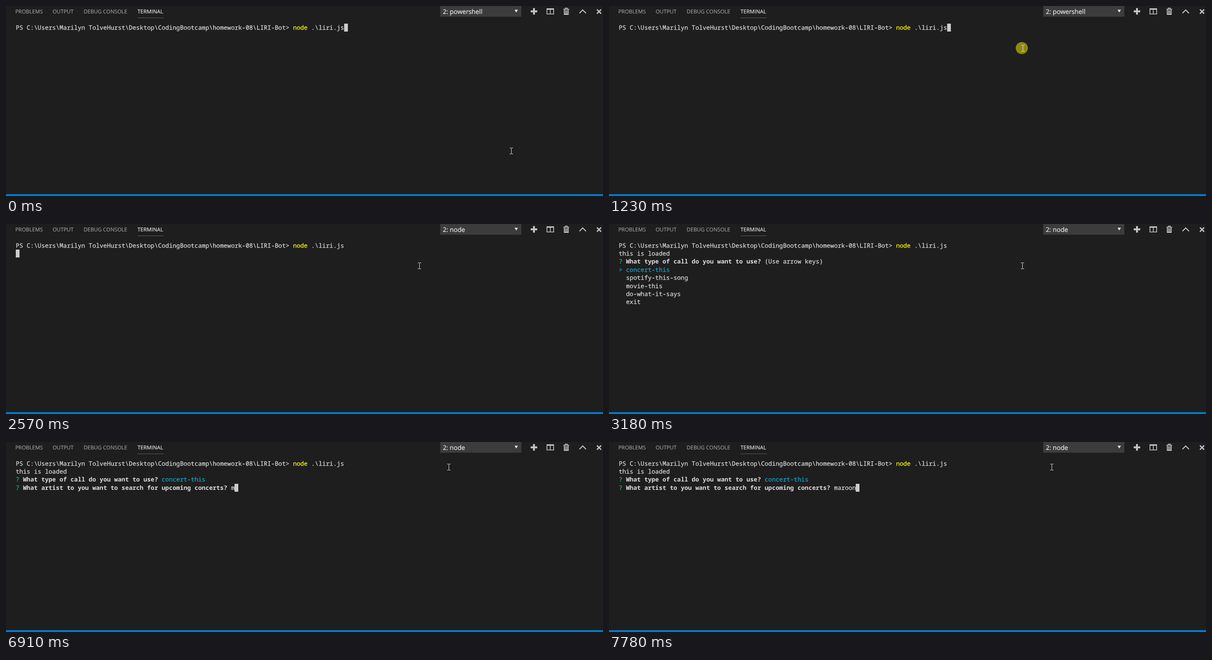
Animation, 1280 px wide and 409 px high, one loop 8 s. Source, as an HTML page:

```html
<!DOCTYPE html>
<html lang="en">
<head>
<meta charset="utf-8">
<title>Terminal session</title>
<style>
  html, body { margin: 0; width: 100%; height: 100%; overflow: hidden; background: #1e1e1e; }
  body { position: relative; text-rendering: geometricPrecision; }
  svg { position: absolute; left: 0; top: 0; font-family: "Open Sans", "Noto Sans", sans-serif; }
  .tabs { font-size: 11.4px; fill: #a0a0a0; stroke: #a0a0a0; stroke-width: .15; }
  .tabs .active { fill: #ededed; stroke: #ededed; }
  #shell { font-size: 13.7px; fill: #f0f0f0; stroke: #f0f0f0; stroke-width: .2; }
  .icons { fill: none; stroke: #c5c5c5; }
  pre {
    position: absolute; left: 20.9px; top: 37.6px; margin: 0;
    font: 13px/17.4px "Noto Sans Mono", "DejaVu Sans Mono", monospace;
    letter-spacing: .022px; font-variant-ligatures: none;
    color: #dadada; -webkit-text-stroke: .25px;
  }
  pre b { color: #dedede; -webkit-text-stroke: 0; }
  .yellow { color: #ffff00; }
  .green { color: #0dbc79; }
  .cyan { color: #11a8cd; }
</style>
</head>
<body>
<pre id="output"></pre>
<svg width="1280" height="409" viewBox="0 0 1280 409">
  <g class="tabs">
    <text x="20" y="16">PROBLEMS</text>
    <text x="100" y="16">OUTPUT</text>
    <text x="166.5" y="16">DEBUG CONSOLE</text>
    <text x="282" y="16" class="active">TERMINAL</text>
  </g>
  <path d="M282 25.5h56" stroke="#5c5c5c"/>
  <path d="M931 0h174v23h-174z" fill="#3c3c3c"/>
  <text id="shell" x="936.5" y="17"></text>
  <path d="M1090.5 8h7l-3.5 6z" fill="#f0f0f0"/>
  <g class="icons">
    <path d="M1125 11.5h14M1132 4.5v14" stroke-width="4"/>
    <path d="M1159 6.5h16" stroke-width="3"/>
    <path d="M1159.8 6v11.2h14.4V6M1167 6v11" stroke-width="1.6"/>
    <path d="M1195 7h12.5M1199 6.5v-2h4.5v2" stroke-width="1.6"/>
    <path d="M1197 8v10h8.5V8M1199.8 9v8M1202.7 9v8" stroke-width="1.8"/>
    <path d="M1229.5 15.5l7-7 7 7" stroke-width="2"/>
    <path d="M1267 7.5l9 9M1276 7.5l-9 9" stroke-width="2.6"/>
  </g>
  <path d="M0 405h1280v4H0z" fill="#007acc"/>
  <rect id="caret" width="8" height="17" fill="#cccccc"/>
  <circle id="click" cx="885" cy="90.5" r="13" fill="#8a8a10"/>
  <path id="pointer" fill="none" stroke="#e4e4e4"
    d="M-3.5 -6.5h3M.5 -6.5h3M0 -6v12M-3.5 6.5h3M.5 6.5h3"/>
</svg>
<script>
const LOOP = 8000, CHAR = 7.822, LINE = 17.4, LEFT = 20.9, TOP = 37.6;
const $ = id => document.getElementById(id);
const paint = (color, text) => `<span class="${color}">${text}</span>`;
const ask = text => `${paint("green", "?")} <b>${text}</b> `;

const command = "PS C:\\Users\\Marilyn TolveHurst\\Desktop\\CodingBootcamp\\homework-08\\LIRI-Bot&gt; "
  + paint("yellow", "node") + " .\\liri.js";
const callQuestion = ask("What type of call do you want to use?");
const artistQuestion = ask("What artist to you want to search for upcoming concerts?");
const menu = [
  callQuestion + "(Use arrow keys)",
  paint("cyan", "&gt; concert-this"),
  "  spotify-this-song", "  movie-this", "  do-what-it-says", "  exit"
];
const artist = "maroon";
const keyTimes = [6910, 7060, 7220, 7460, 7610, 7780];

// Terminal lines and the caret's [column, row]
function terminalAt(t) {
  if (t < 2480) return { lines: [command], caret: [90, 0] };
  if (t < 3180) return { lines: [command], caret: [0, 1] };
  const loaded = [command, "this is loaded"];
  if (t < 5120) return { lines: [...loaded, ...menu] };
  const typed = keyTimes.filter(time => time <= t).length;
  return {
    lines: [...loaded, callQuestion + paint("cyan", "concert-this"),
      artistQuestion + artist.slice(0, typed)],
    caret: [59 + typed, 3]
  };
}

function pointerAt(t) {
  if (t >= 6280) return [949.5, 54];
  if (t >= 6220) return [919.5, 71];
  if (t >= 1870) return [886.5, 90];
  if (t >= 1550) return [886.5, 91];
  const step = t < 70 ? 0 : Math.min(10, 1 + Math.floor((t - 70) / (680 / 9) + 1e-6));
  const p = step / 10, eased = p * p * (3 - 2 * p);
  return [1083.5 - Math.round(196 * eased), 312 - Math.round(221 * eased)];
}

let shown = "";
function render() {
  const t = performance.now() % LOOP;
  const { lines, caret } = terminalAt(t);
  const html = lines.join("\n");
  if (html !== shown) $("output").innerHTML = shown = html;

  $("caret").style.display = caret ? "" : "none";
  if (caret) {
    $("caret").setAttribute("x", Math.round(LEFT + caret[0] * CHAR));
    $("caret").setAttribute("y", Math.round(TOP + caret[1] * LINE));
  }
  $("shell").textContent = t < 2570 ? "2: powershell" : "2: node";
  $("click").style.display = t >= 1230 && t < 1380 ? "" : "none";
  $("pointer").setAttribute("transform", `translate(${pointerAt(t)})`);
  requestAnimationFrame(render);
}
render();
</script>
</body>
</html>
```
